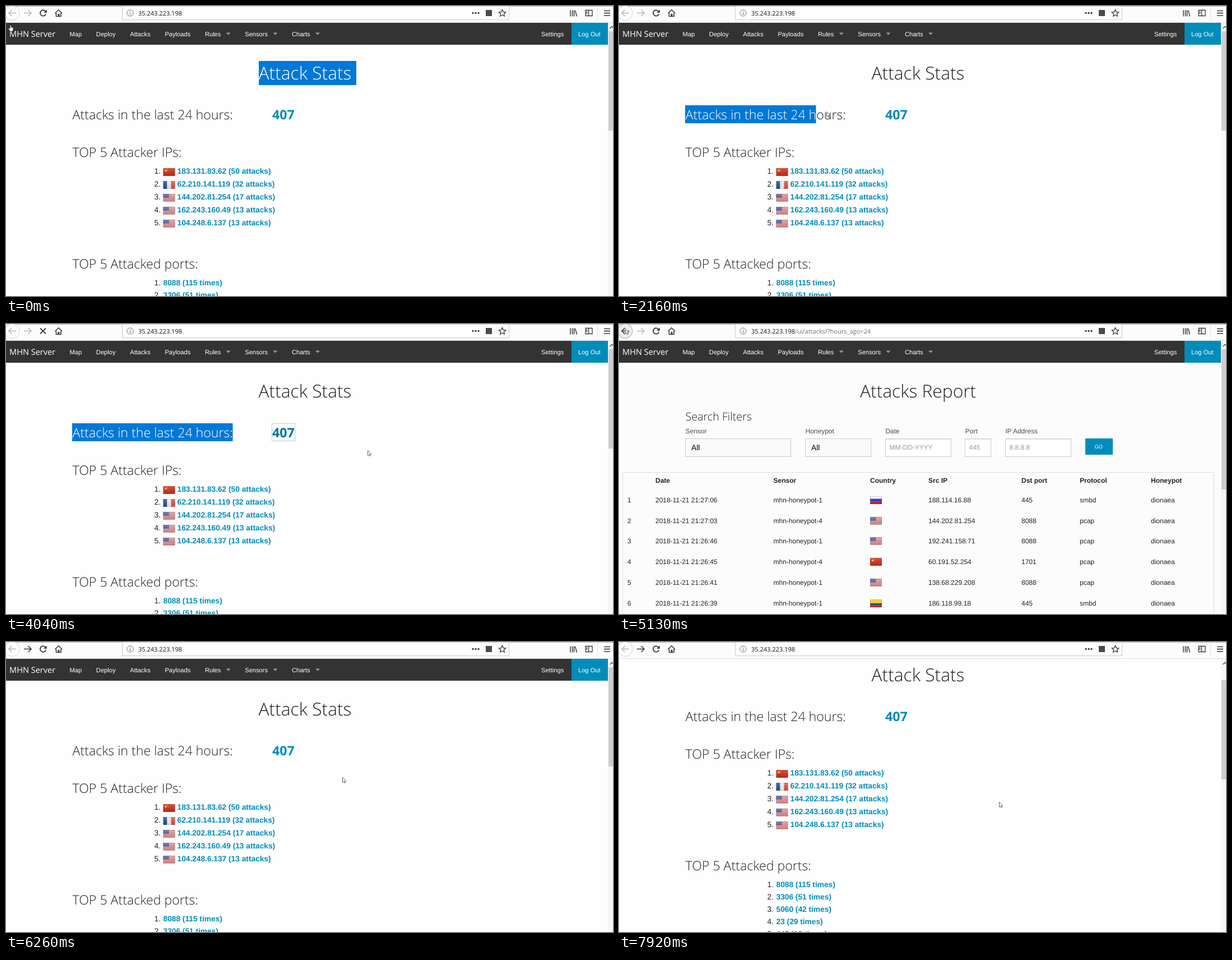
Write an HTML page with a canvas that moves like this. It is 1083 px wide and 517 px high and loops after 8000 ms.

```html
<!DOCTYPE html>
<html lang="en">
<head>
<meta charset="utf-8">
<title>Attack Stats</title>
<style>
  html, body { margin: 0; width: 100%; height: 100%; overflow: hidden; background: #fff; }
  canvas { display: block; }
</style>
</head>
<body>
<canvas id="stage" width="1083" height="517"></canvas>
<script>
const ctx = document.getElementById('stage').getContext('2d');
ctx.textRendering = 'geometricPrecision';

const LOOP = 8000, TICK = 130;
const ZOOM = 0.8575, LEFT = 118.5, GUTTER = 15 * ZOOM;
const BLUE = '#008cba', INK = '#222', ICON = '#3a3a3e', FADED = '#b9b9bb';
const openSans = (px, weight = 300) => `${weight} ${px * ZOOM}px "Open Sans", sans-serif`;
const arial = (px, weight = 400) => `${weight} ${px * ZOOM}px "Liberation Sans", Arial, sans-serif`;
const URL_FONT = '400 11px "Open Sans", sans-serif';

const TITLE_CLEARED = 990, LINK_CLICKED = 3640, SELECTION_CLEARED = 6110;
const PAGE_OPENS = 4180, PAGE_CLOSES = 5280, SCROLL_STARTS = 7630;

// Each hop of the pointer: start, end, destination.
const HOPS = [
  [150, 1130, 112, 186],
  [1250, 1250, 98, 214],
  [1380, 2290, 378, 187],
  [2420, 2840, 404, 192],
  [3250, 3510, 488, 194],
  [3780, 4040, 645, 225],
  [4320, 4590, 220, 190],
  [4730, 5130, 11, 8],
  [5420, 5560, 207, 193],
  [5830, 6260, 600, 241],
  [6540, 6800, 190, 125],
  [6930, 7060, 240, 324],
  [7190, 7330, 678, 285],
];

function pointer(t) {
  let x = 8, y = 38;
  for (const [start, end, toX, toY] of HOPS) {
    if (t < start) break;
    const jumps = Math.round((end - start) / TICK) + 1;
    const jump = Math.min(jumps, Math.floor((t - start) / TICK) + 1);
    const eased = 1 - (1 - jump / jumps) ** 1.7;
    x += (toX - x) * eased;
    y += (toY - y) * eased;
  }
  return [x, y];
}

// The highlight trails the dragging pointer by one tick.
function selectionEnd(t) {
  if (t >= SELECTION_CLEARED) return 0;
  return Math.min(404.5, pointer(Math.min(t, LINK_CLICKED) - TICK)[0]);
}

function scrollOffset(t) {
  if (t < SCROLL_STARTS) return 0;
  const jump = Math.min(3, Math.floor((t - SCROLL_STARTS) / 140) + 1);
  return Math.round(61 * (jump / 3) ** 2.3);
}

function rect(x, y, w, h, color) {
  ctx.fillStyle = color;
  ctx.fillRect(x, y, w, h);
}
function frame(x, y, w, h, color) {
  ctx.strokeStyle = color;
  ctx.lineWidth = 1;
  ctx.strokeRect(x + 0.5, y + 0.5, w - 1, h - 1);
}
function text(str, x, y, font, color = INK) {
  ctx.font = font;
  ctx.fillStyle = color;
  ctx.fillText(str, x, Math.round(y));
  return ctx.measureText(str).width;
}
function line(d, color = ICON, width = 1.6) {
  ctx.strokeStyle = color;
  ctx.lineWidth = width;
  ctx.stroke(new Path2D(d));
}
function shape(d, color) {
  ctx.fillStyle = color;
  ctx.fill(new Path2D(d));
}
function circle(x, y, r, fill, stroke) {
  ctx.beginPath();
  ctx.arc(x, y, r, 0, Math.PI * 2);
  if (fill) { ctx.fillStyle = fill; ctx.fill(); }
  if (stroke) { ctx.strokeStyle = stroke; ctx.lineWidth = 1; ctx.stroke(); }
}
function selectedText(str, x, y, font, box) {
  rect(...box, '#0078d7');
  ctx.save();
  ctx.beginPath();
  ctx.rect(...box);
  ctx.clip();
  text(str, x, y, font, '#fff');
  ctx.restore();
}

const STRIPES = {
  cn: ['#d0301c'],
  us: Array.from({ length: 14 }, (_, i) => i % 2 ? '#f3dedd' : '#d0494c'),
  ru: ['#f6f6f6', '#1638d8', '#e01a20'],
  co: ['#f7d117', '#f7d117', '#26408f', '#cf2436'],
  fr: ['#20559f', '#f4f4f4', '#e5533f'],
};

function flag(country, x, y) {
  const w = 21, h = 14, colors = STRIPES[country];
  colors.forEach((color, i) => {
    const part = i / colors.length;
    if (country === 'fr') rect(x + part * w, y, w / 3, h, color);
    else rect(x, y + part * h, w, h / colors.length, color);
  });
  if (country === 'us') {
    rect(x, y, 10, 7, '#45539b');
    for (let i = 0; i < 9; i++) rect(x + 1 + i % 3 * 3, y + 1 + Math.floor(i / 3) * 2, 1, 1, '#a8b0d4');
  }
  if (country === 'cn') {
    circle(x + 4.5, y + 4.5, 1.8, '#f5c84a');
    for (let a = -1; a < 1; a += 0.5) rect(x + 4 + 4 * Math.cos(a), y + 4 + 4 * Math.sin(a), 1, 1, '#f0a040');
  }
  const gloss = ctx.createLinearGradient(0, y, 0, y + h);
  gloss.addColorStop(0, 'rgba(255,255,255,.2)');
  gloss.addColorStop(1, 'rgba(0,0,0,.08)');
  rect(x, y, w, h, gloss);
  frame(x, y, w, h, 'rgba(70,50,50,.18)');
}

function navBar() {
  rect(0, 30, 1074, 39, '#333');
  rect(1009, 30, 65, 39, BLUE);
  text('MHN Server', 6, 55, openSans(17, 400), '#fff');
  let x = 113.5;
  for (const label of ['Map', 'Deploy', 'Attacks', 'Payloads', 'Rules', 'Sensors', 'Charts']) {
    x += text(label, x, 54, arial(13), '#fff') + 2 * GUTTER;
    if (/Rules|Sensors|Charts/.test(label)) {
      shape(`M${x - GUTTER - 3.5} 47.5h8l-4 4.3z`, '#999');
      x += 20 * ZOOM;
    }
  }
  text('Settings', 955, 54, arial(13), '#fff');
  text('Log Out', 1021, 54, arial(13), '#fff');
}

const ATTACKERS = ['cn 183.131.83.62 (50 attacks)', 'fr 62.210.141.119 (32 attacks)',
  'us 144.202.81.254 (17 attacks)', 'us 162.243.160.49 (13 attacks)', 'us 104.248.6.137 (13 attacks)'];
const PORTS = ['8088 (115 times)', '3306 (51 times)', '5060 (42 times)', '23 (29 times)', '445 (19 times)'];

function statsPage(t) {
  const title = ['Attack Stats', 450.5, 131, openSans(37)];
  text(...title);
  if (t < TITLE_CLEARED) selectedText(...title, [451, 98, 174, 43]);

  const heading = openSans(27);
  const summary = ['Attacks in the last 24 hours:', LEFT, 202, heading];
  const selected = selectionEnd(t) - 118;
  text(...summary);
  if (selected > 0) selectedText(...summary, [118, 177, selected, 32]);

  const focused = t >= LINK_CLICKED && t < SELECTION_CLEARED;
  text('407', 475, 202, openSans(27, 700), focused ? '#00739a' : BLUE);
  if (focused) frame(474, 177, 42, 32, '#a9d5e3');

  text('TOP 5 Attacker IPs:', LEFT, 269, heading);
  ATTACKERS.forEach((entry, i) => {
    const y = Math.round(299 + i * 22.9);
    text(`${i + 1}.`, 264.5, y, arial(16));
    flag(entry.slice(0, 2), 280.5, y - 10);
    text(entry.slice(3), 305.5, y, arial(16, 700), BLUE);
  });

  text('TOP 5 Attacked ports:', LEFT, 468, heading);
  PORTS.forEach((label, i) => {
    const y = 498 + i * 22;
    text(`${i + 1}.`, 264.5, y, arial(16));
    text(label, 280.5, y, arial(16, 700), BLUE);
  });
}

const FIELDS = [['Sensor', 3, 'All'], ['Honeypot', 2, 'All'], ['Date', 2, 'MM-DD-YYYY'],
  ['Port', 1, '445'], ['IP Address', 2, '8.8.8.8']];
const COLUMNS = { 'Date': 65, 'Sensor': 275.5, 'Country': 448, 'Src IP': 552,
  'Dst port': 718, 'Protocol': 822, 'Honeypot': 949 };
const ATTACKS = `27:06 1 ru 188.114.16.88 445 smbd
27:03 4 us 144.202.81.254 8088 pcap
26:46 1 us 192.241.158.71 8088 pcap
26:45 4 cn 60.191.52.254 1701 pcap
26:41 1 us 138.68.229.208 8088 pcap
26:39 1 co 186.118.99.18 445 smbd`.split('\n').map(row => row.split(' '));

function reportPage() {
  rect(0, 30, 1074, 487, '#fcfcfc');
  text('Attacks Report', 430, 131, openSans(37));
  text('Search Filters', LEFT, 172, openSans(23));

  const unit = 71.33;
  let left = LEFT;
  for (const [label, span, value] of FIELDS) {
    const x = Math.floor(left), width = Math.round(span * unit - 2 * GUTTER + 1);
    const isSelect = value === 'All';
    text(label, left, 195, arial(14), '#4d4d4d');
    rect(x, 204, width, 33, isSelect ? '#fafafa' : '#fff');
    if (!isSelect) rect(x + 1, 205, width - 2, 2, '#f0f0f0');
    frame(x, 204, width, 33, '#ccc');
    if (isSelect) text(value, x + 11, 225, arial(16), '#000');
    else text(value, x + 7.5, 224, arial(14), '#999');
    left += span * unit;
  }
  rect(832, 204, 49, 29, BLUE);
  text('GO', 848.5, 222, arial(11), '#fff');

  frame(6, 264, 1056, 300, '#ddd');
  const columns = Object.values(COLUMNS);
  Object.keys(COLUMNS).forEach((label, c) => text(label, columns[c], 283, arial(14, 700)));
  ATTACKS.forEach(([time, sensor, country, ...rest], i) => {
    const y = Math.round(317.8 + i * 36.8);
    text(`${i + 1}`, 15, y, arial(14));
    flag(country, 448, y - 11);
    const cells = [`2018-11-21 21:${time}`, `mhn-honeypot-${sensor}`, '', ...rest, 'dionaea'];
    cells.forEach((cell, c) => text(cell, columns[c], y, arial(14)));
  });
}

function toolbar(t, onReport) {
  rect(0, 0, 1083, 30, '#fcfcfd');
  rect(0, 0, 1083, 1, '#b4b4b6');
  rect(0, 29, 1083, 1, '#dededf');
  rect(207, 1, 691, 24, '#fff');
  frame(207, 0, 691, 25, '#cbcbcd');

  circle(11, 12.5, 13, onReport ? '#ececee' : '#fdfdfd', onReport ? '#a8a8aa' : '#d2d2d4');
  line('M18 12.5H5M10.5 7L5 12.5L10.5 18', onReport ? ICON : FADED);
  line('M32 12.5H45M39.5 7L45 12.5L39.5 18', t >= PAGE_CLOSES ? ICON : FADED);
  if (t >= LINK_CLICKED && t < PAGE_OPENS) {
    line('M61 7.5L71 17.5M71 7.5L61 17.5', ICON, 1.8);
  } else {
    line('M70.5 9.5A5.2 5.2 0 1 0 71.2 14', ICON, 1.8);
    shape('M72.8 6.5v5.5h-5.5z', ICON);
  }
  line('M87.5 13L93.8 6.8L100 13M89.5 12.5V18.5H98V12.5');
  rect(92.5, 14, 3, 5, ICON);

  circle(221.5, 12.5, 5.6, null, '#707074');
  line('M221.5 9v1.3M221.5 11.5v4.5', '#707074', 1.2);
  const hostWidth = text('35.243.223.198', 236, 17, URL_FONT, '#111');
  if (onReport) text('/ui/attacks/?hours_ago=24', 236 + hostWidth, 17, URL_FONT, '#707074');

  for (let i = 0; i < 3; i++) circle(833 + i * 5, 12.5, 1.7, ICON);
  rect(856, 7, 11, 11, '#4a4a4f');
  let star = '';
  for (let i = 0; i < 10; i++) {
    const r = i % 2 ? 3 : 6.5, a = i * Math.PI / 5;
    star += `${i ? 'L' : 'M'}${885.5 + r * Math.sin(a)} ${13 - r * Math.cos(a)}`;
  }
  line(star + 'Z', ICON, 1.3);
  line('M1007 7.5v11M1010.5 7.5v11M1013.5 7.5v11M1015.5 8l3 10.5', ICON, 1.5);
  line('M1034 7.5h12v10h-12zM1039.5 7.5v10M1035 10.5h2.5M1035 13h2.5', ICON, 1.3);
  rect(1055, 2, 1, 24, '#e2e2e4');
  line('M1067 8.5h11M1067 12.7h11M1067 17h11', ICON, 1.7);
}

function scrollBar(offset, onReport) {
  rect(1074, 30, 9, 487, '#f6f6f6');
  line('M1077.5 40l3.5-3.5l3.5 3.5', '#505050', 1.5);
  rect(1075, Math.round(45 + offset * 0.377), 8, onReport ? 250 : 177, '#cdcdcd');
}

function cursor(x, y, isHand) {
  const outline = isHand
    ? 'M-1-4.5h2v4l4 1v4l-1.5 3h-4l-3.5-5l1-1l2 1z'
    : 'M.5 .5v9l2.1-1.9l1.4 2.9l1.3-.6l-1.3-2.8h2.8z';
  ctx.save();
  ctx.translate(Math.round(x), Math.round(y));
  shape(outline, '#fff');
  line(outline, isHand ? '#222' : '#55555c', 0.9);
  ctx.restore();
}

function draw(now) {
  const t = now % LOOP;
  const onReport = t >= PAGE_OPENS && t < PAGE_CLOSES;
  const offset = scrollOffset(t);
  const [x, y] = pointer(t);

  rect(0, 0, 1083, 517, '#fefefe');
  ctx.save();
  ctx.translate(0, -offset);
  if (onReport) reportPage();
  else statsPage(t);
  navBar();
  ctx.restore();
  scrollBar(offset, onReport);
  toolbar(t, onReport);

  const overLink = y < 69 && !onReport && t < 1000 || Math.abs(x - 495) < 20 && t < PAGE_OPENS;
  cursor(x, y, overLink);
  requestAnimationFrame(draw);
}
requestAnimationFrame(draw);
</script>
</body>
</html>
```
